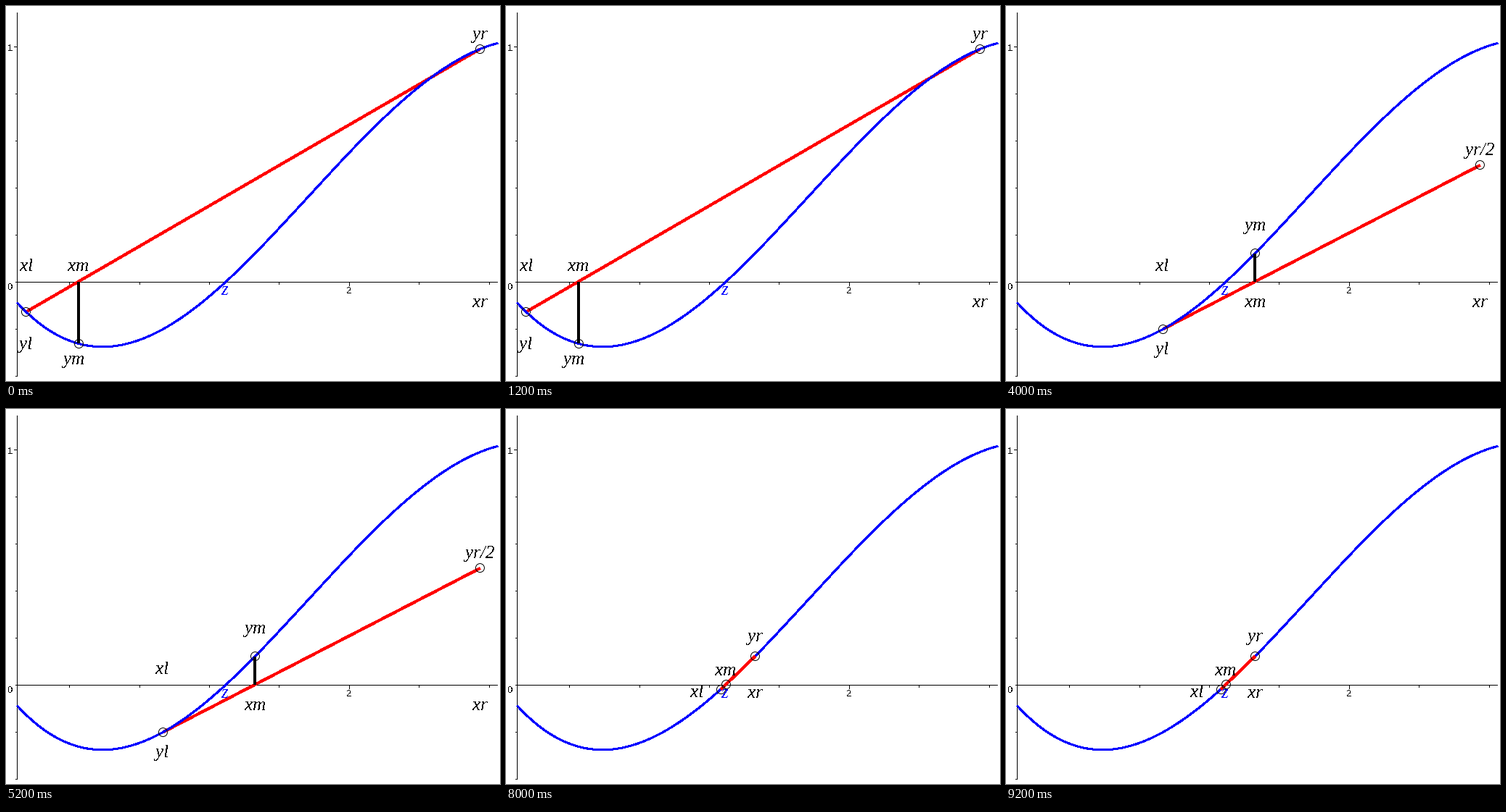
A matplotlib script that plays this animation: 681 by 518 pixels, repeating every 10000 ms.

```python
import numpy as np
import matplotlib.pyplot as plt
from matplotlib.animation import FuncAnimation
from matplotlib.patches import Circle

W, H, DPI = 681, 518, 72
AXIS_X, AXIS_Y = 15, 380

fig = plt.figure(figsize=(W / DPI, H / DPI), dpi=DPI, facecolor="white")
ax = fig.add_axes([0, 0, 1, 1])
# Just off half a pixel, so that whole coordinates snap to their own pixel
ax.set_xlim(-0.45, W - 0.45)
ax.set_ylim(H - 0.55, -0.55)
ax.axis("off")

# Smooth curve through a few points, in stage pixels
knots = [(15, 409.5), (27, 421.8), (63, 449), (99, 466), (133, 470.5),
         (174, 464.3), (215.5, 446.2), (255, 419.6), (295.5, 386.7),
         (302.5, 380.3), (343, 341.2), (408, 272.5), (473, 202),
         (505, 168.3), (583, 100), (653, 59.5), (678, 50.3)]
px, py = np.array(knots).T
curve = np.polynomial.Polynomial.fit(px, py, 6)


def line(xs, ys, color="black", width=1, z=1):
    return ax.plot(xs, ys, color=color, lw=width, zorder=z, antialiased=False,
                   solid_capstyle="butt")[0]


def write(x, y, text, size, family, **style):
    return ax.text(x, y, text, fontsize=size, family=family, ha="center",
                   va="baseline", antialiased=False, zorder=6, **style)


def label(x, y, text, color="black"):
    return write(x, y, text, 25, "Liberation Serif", style="italic",
                 color=color)


def draw_axes():
    line([AXIS_X, AXIS_X], [8, 510])
    line([AXIS_X, 677], [AXIS_Y, AXIS_Y])
    for i in range(8):
        y = 55 + 65 * i
        line([AXIS_X - (4 if i == 0 else 2), AXIS_X], [y, y])
    for i in range(7):
        x = round(87.2 + 96.4 * i)
        line([x, x], [AXIS_Y, AXIS_Y + (5 if i == 4 else 3)])
    for x, y, text in [(5.5, 61, "1"), (6, 391, "0"), (472.5, 396, "2")]:
        write(x, y, text, 13, "Liberation Sans")


def root_steps(xl, xr, count):
    """Illinois variant of false position: halve yr when it is kept twice."""
    yl, yr = curve(xl) - AXIS_Y, curve(xr) - AXIS_Y
    steps, kept = [], 0
    for _ in range(count):
        xm = xl - yl * (xr - xl) / (yr - yl)
        ym = curve(xm) - AXIS_Y
        steps.append((xl, yl, xr, yr, xm, ym))
        if ym > 0:
            xl, yl = xm, ym
            kept += 1
            if kept == 2:
                yr /= 2
        else:
            xr, yr, kept = xm, ym, 0
    return steps


STEPS = root_steps(27.3, 653, 5)
LABELS = [
    [(28, 365, "xl"), (99, 365, "xm"), (27, 473, "yl"), (93, 494, "ym"),
     (653, 45, "yr"), (653, 415, "xr")],
    [(99, 365, "xl"), (215, 365, "xm"), (88, 499, "yl"), (215, 471, "ym"),
     (653, 45, "yr"), (653, 415, "xr")],
    [(215, 365, "xl"), (343, 415, "xm"), (215, 480, "yl"), (343, 309, "ym"),
     (653, 205, "yr/2"), (653, 415, "xr")],
    [(215, 365, "xl"), (295, 365, "xm"), (215, 480, "yl"), (295, 422, "ym"),
     (343, 316, "yr"), (343, 398, "xr")],
    [(263, 397, "xl"), (302, 367, "xm"), (343, 320, "yr"), (343, 398, "xr")],
]

draw_axes()
xs = np.linspace(15, 677.5, 664)
line(xs, curve(xs), "blue", 2, 3)
label(302, 398, "z", "blue")

chord = line([], [], "red", 3, 2)
bar = line([], [], "black", 4, 4)
rings = [ax.add_patch(Circle((0, 0), 6, fill=False, ec="black", lw=1,
                             zorder=5)) for _ in range(3)]
texts = [label(0, 0, "") for _ in range(6)]


def draw(i):
    xl, yl, xr, yr, xm, ym = STEPS[i]
    chord.set_data([xl, xr], [AXIS_Y + yl, AXIS_Y + yr])
    chord.set_zorder(3.5 if i == len(STEPS) - 1 else 2)
    bar.set_data([xm, xm], [AXIS_Y, AXIS_Y + ym])
    for ring, x, y in zip(rings, (xl, xr, xm), (yl, yr, ym)):
        ring.center = (round(x), round(AXIS_Y + y))
    for t in texts:
        t.set_text("")
    for t, (x, y, name) in zip(texts, LABELS[i]):
        t.set_position((x, y))
        t.set_text(name)
    return [chord, bar, *rings, *texts]


anim = FuncAnimation(fig, draw, frames=5, interval=2000, repeat=True,
                     repeat_delay=0, blit=False)
plt.show()
```
